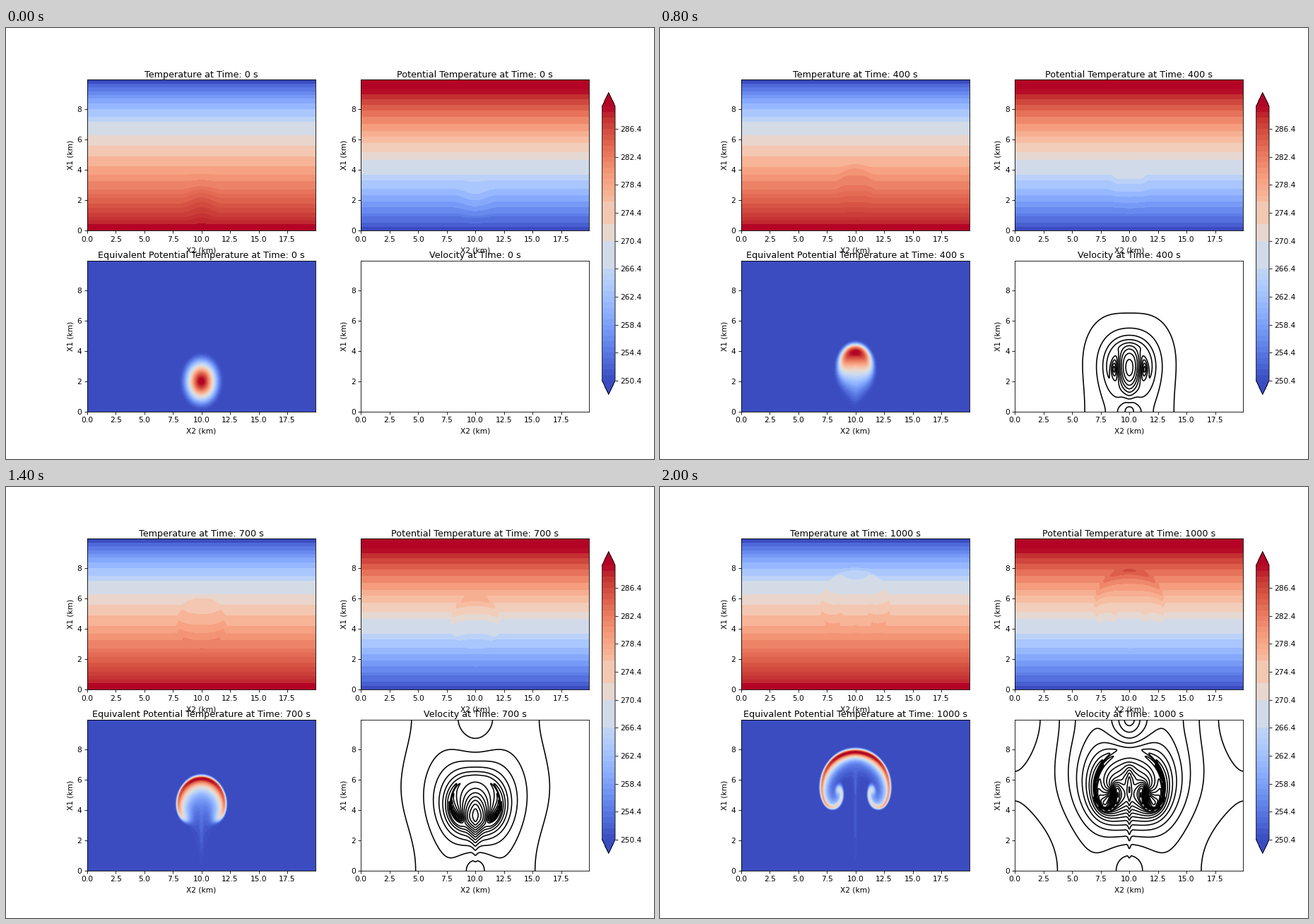
Animation, 917 px wide and 611 px high, one loop 2.2 s. Source, as a matplotlib script:

```python
import numpy as np
import matplotlib.pyplot as plt
from matplotlib.animation import FuncAnimation
from matplotlib.cm import ScalarMappable
from matplotlib.colors import BoundaryNorm, ListedColormap

FRAMES, INTERVAL = 11, 200
DPI = 76.4

# Rising warm bubble, solved on the right half of a 20 x 10 km box.
N = 160                      # cells per side
L = 10.0                     # km
H = L / N                    # cell size
SCALE = 9.7                  # density scale height, km
STEPS = 32                   # time steps per frame
DT = 100 / STEPS

pos = (np.arange(N) + 0.5) * H
x, z = np.meshgrid(pos, pos)
wave = np.arange(1, N + 1) * np.pi / L
SIN = np.sin(np.outer(pos, wave))
COS = np.cos(np.outer(pos, wave)) * wave
FWD = SIN.T * 2 / N
FWD[-1] /= 2
LAPLACE = -1 / (wave[:, None]**2 + wave**2 + 0.25 / SCALE**2)
LIFT = np.exp(z / (2 * SCALE))
# Moist buoyancy per unit of bubble strength grows with height, km / s^2.
BUOY = 9.81e-3 * 2 / 300 * (0.74 + 0.06 * z)
GHOST = -np.ones((2, N + 4, N + 4))
GHOST[0] = 1
GHOST[1, 2:-2, 2:-2] = 1


def velocity(q):
    """Horizontal and vertical wind from vorticity over density."""
    c = LAPLACE * (FWD @ (q / LIFT**3) @ FWD.T)
    sc = SIN @ c
    phi, phi_x, phi_z = sc @ SIN.T, sc @ COS.T, COS @ c @ SIN.T
    return -LIFT * (phi_z - phi / (2 * SCALE)), LIFT * phi_x


def upwind(v, m2, m1, c, p1, p2):
    """Third-order upwind transport term."""
    far, near = m2 + p2, m1 + p1
    slope = m2 - p2 + 8 * (p1 - m1)
    return (v * slope + np.abs(v) * (far - 4 * near + 6 * c)) / (12 * H)


def tendency(s):
    u, w = velocity(s[1])
    g = np.pad(s, ((0, 0), (2, 2), (2, 2)), mode="symmetric") * GHOST
    cols = [g[:, 2:-2, i:i + N] for i in range(5)]
    rows = [g[:, i:i + N, 2:-2] for i in range(5)]
    out = -upwind(u, *cols) - upwind(w, *rows)
    out[1] += LIFT**2 * BUOY * (cols[3][0] - cols[1][0]) / (2 * H)
    return out


def advance(s):
    a = s + DT * tendency(s)
    b = 0.75 * s + 0.25 * (a + DT * tendency(a))
    return s / 3 + 2 / 3 * (b + DT * tendency(b))


def whole(f):
    """Mirror to the full width and add one cell around."""
    return np.pad(np.hstack([f[:, ::-1], f]), 1, mode="edge")


def simulate():
    dist = np.minimum(np.hypot(x, z - 2) / 2, 1)
    s = np.stack([np.cos(np.pi * dist / 2)**2, np.zeros_like(x)])
    states = []
    for n in range(FRAMES):
        if n:
            for _ in range(STEPS):
                s = advance(s)
        speed = 1000 * np.hypot(*velocity(s[1]))
        states.append((whole(np.clip(s[0], 0, None)), whole(speed)))
    return states


STATES = simulate()
X = (np.arange(2 * N + 2) - 0.5) * H
Z = (np.arange(N + 2) - 0.5) * H
HEIGHT = np.repeat(Z[:, None], len(X), axis=1)

# Heights (km) at which the undisturbed colour bands meet.
T_EDGES = [0.43, 0.7, 0.9, 1.2, 1.5, 1.8, 2.15, 2.43, 2.73, 3.27, 3.73, 4.24,
           4.9, 5.6, 6.29, 7.18, 7.5, 8.01, 8.39, 8.69, 8.94, 9.18, 9.43, 9.69]
P_EDGES = [0.28, 0.55, 0.97, 1.15, 1.55, 1.94, 2.37, 2.76, 3.35, 3.73, 4.67,
           5.15, 5.77, 6.2, 6.57, 7.05, 7.5, 7.93, 8.3, 8.65, 8.97, 9.3]
warm = plt.get_cmap("coolwarm")


def bands(edges, tone):
    """Contour levels and one colour per band."""
    ends = np.array([0, *edges, 9.95])
    shade = tone((ends[:-1] + ends[1:]) / 2)
    shade[[0, -1]] = np.round(shade[[0, -1]])
    return [-9, *edges, 29], warm(shade)


T_BANDS = bands(T_EDGES,
                lambda h: 1 - 0.062 * h - 0.00015 * h**2 - 0.000374 * h**3)
P_BANDS = bands(P_EDGES, lambda h: 0.1085 * h)

fig, axes = plt.subplots(2, 2, figsize=(917 / DPI + 1e-6, 611 / DPI + 1e-6),
                         dpi=DPI)
NAMES = ["Temperature", "Potential Temperature",
         "Equivalent Potential Temperature", "Velocity"]


def draw_colorbar():
    levels = 250.4 + 0.8 * np.arange(50)
    u = (np.arange(49) + 0.5) / 49
    for lo, hi in [(0.4, 0.51), (0.51, 0.57), (0.57, 0.65)]:
        u[(u > lo) & (u < hi)] = (lo + hi) / 2
    cmap = ListedColormap(warm(u)).with_extremes(under=warm(0.0),
                                                 over=warm(1.0))
    bar = fig.colorbar(ScalarMappable(BoundaryNorm(levels, 49), cmap),
                       cax=fig.add_axes([0.92, 0.15, 0.02, 0.7]),
                       extend="both", ticks=levels[::5], format="%.1f")
    bar.minorticks_off()


def update(n):
    bubble, speed = STATES[n]
    for ax, name in zip(axes.flat, NAMES):
        ax.clear()
        ax.set_title(f"{name} at Time: {100 * n} s", pad=3.4)
        ax.set_xlabel("X2 (km)", labelpad=5.4)
        ax.set_ylabel("X1 (km)")
    temp, pot, equiv, wind = axes.flat

    levels, colors = T_BANDS
    temp.contourf(X, Z, HEIGHT - 0.42 * bubble, levels, colors=colors)
    levels, colors = P_BANDS
    pot.contourf(X, Z, HEIGHT + (0.3 + 0.025 * HEIGHT) * bubble, levels,
                 colors=colors)

    equiv.contourf(X, Z, bubble, np.linspace(0.005, 0.985 * bubble.max(), 50),
                   cmap="coolwarm", extend="both")
    if speed.max() > 1:
        wind.contour(X, Z, speed, np.arange(1, speed.max()), colors="black")

    for ax in axes.flat:
        ax.set_xlim(0, 19.95)
        ax.set_ylim(0, 9.95)
    return []


draw_colorbar()
anim = FuncAnimation(fig, update, frames=FRAMES, interval=INTERVAL,
                     repeat=True, repeat_delay=0)
plt.show()
```
